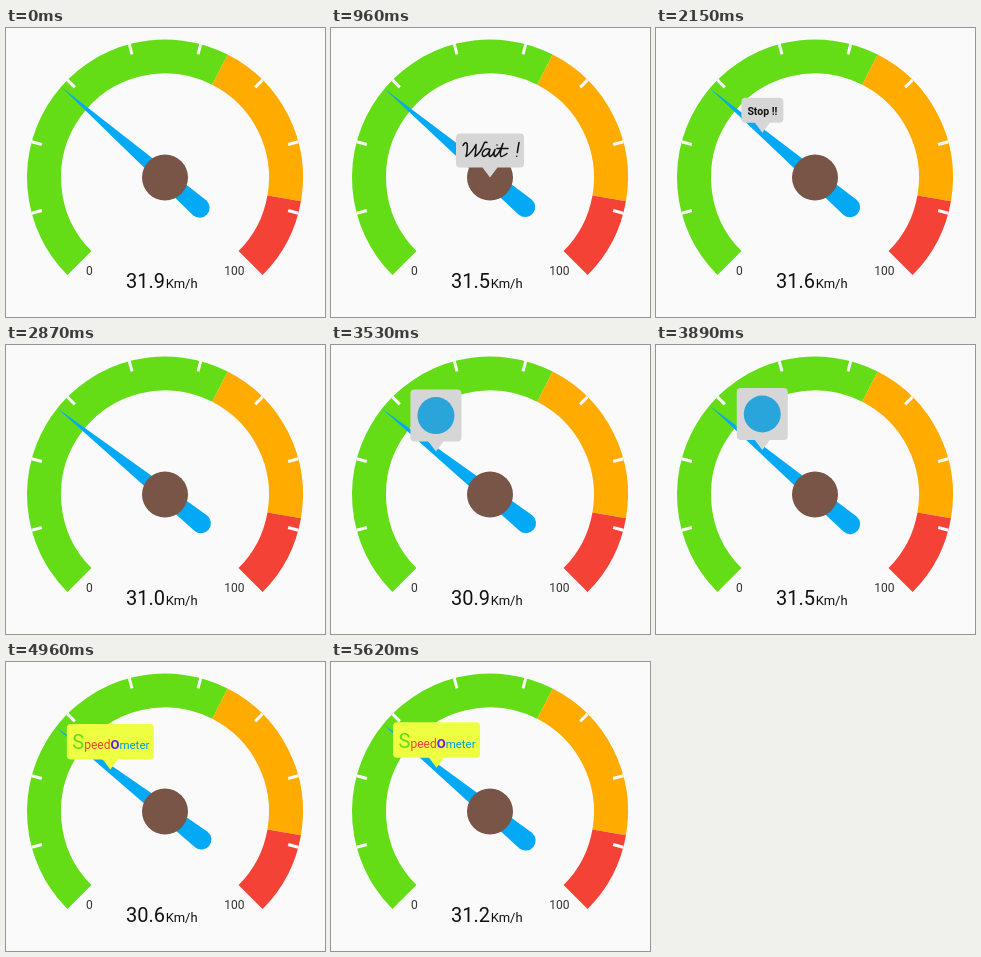
Write an HTML page that moves like this. It is 319 px wide and 289 px high and loops after 5.67 s.

```html
<!DOCTYPE html>
<html lang="en">
<head>
<meta charset="utf-8">
<title>Speed gauge</title>
<style>
  html, body { margin: 0; width: 100%; height: 100%; overflow: hidden; background: #fafafa; }
  svg { display: block; width: 319px; height: 289px; font-family: Roboto, "Open Sans", sans-serif; }
</style>
</head>
<body>
<svg viewBox="0 0 319 289">
  <g transform="translate(159 149.5)">
    <g id="dial" fill="none"></g>
    <path id="needle" d="M138 0L-46 10A10 10 0 0 1 -46 -10Z" fill="#03a9f4"/>
    <circle r="23" fill="#795548"/>
  </g>
  <g font-size="12" fill="#333" text-anchor="middle">
    <text x="83.3" y="247">0</text>
    <text x="228.3" y="247">100</text>
  </g>
  <text id="speed" x="159" y="260" font-size="20" fill="#111" text-anchor="end"></text>
  <text x="159.7" y="260" font-size="13" fill="#111">Km/h</text>

  <!-- Each note has its pointer tip at the local origin -->
  <g class="note" data-w="68" data-h="34" data-color="#d6d6d6" data-r="0" data-from="400" data-to="1400">
    <g role="img" aria-label="Wait !" fill="none" stroke="#111" stroke-width="1.5" stroke-linecap="round" stroke-linejoin="round">
      <path d="M-27 -32Q-25 -36 -23 -34Q-22 -29 -24 -21Q-18 -25 -14 -33Q-14 -27 -15 -21Q-9 -25 -6 -34Q-5 -36 -3 -35"/>
      <path d="M0 -28Q-4 -30 -7 -26Q-9 -22 -6 -21Q-2 -22 0 -28Q-2 -22 0 -21Q3 -22 5 -28Q3 -22 5 -21Q9 -23 13 -34Q9 -23 11 -21Q13 -21 17 -24"/>
      <path d="M7 -29H18M7 -32.5V-32.4M29 -35L27.3 -25M26.7 -21.3V-21.2"/>
    </g>
  </g>
  <g class="note" data-w="42" data-h="25" data-color="#d6d6d6" data-r="69" data-from="1850" data-to="2850">
    <text y="-18" font-size="10.5" font-weight="700" fill="#111" text-anchor="middle">Stop !!</text>
  </g>
  <g class="note" data-w="51" data-h="52" data-color="#d6d6d6" data-r="69" data-from="3300" data-to="4300">
    <circle cy="-36" r="18.5" fill="#29a5dc"/>
  </g>
  <g class="note" data-w="87" data-h="35.5" data-color="#eeff41" data-r="69" data-from="4800" data-to="5670">
    <text x="-38" y="-20" font-size="12" fill="#f44336"><tspan font-size="20" fill="#64dd17">S</tspan>peed<tspan font-size="13" font-weight="700" fill="#651fff">O</tspan><tspan font-size="11.5" fill="#039be5">meter</tspan></text>
  </g>
</svg>
<script>
const LOOP = 5670;
const $ = id => document.getElementById(id);
const angleOf = value => 135 + value * 2.7;

function polar(r, degrees) {
  const a = degrees * Math.PI / 180;
  return [r * Math.cos(a), r * Math.sin(a)];
}

function addPath(parent, attrs, first) {
  const path = document.createElementNS("http://www.w3.org/2000/svg", "path");
  for (const key in attrs) path.setAttribute(key, attrs[key]);
  parent.insertBefore(path, first ? parent.firstChild : null);
}

function addBand(from, to, color) {
  const large = to - from > 66 ? 1 : 0;
  const d = `M${polar(121, angleOf(from))}A121 121 0 ${large} 1 ${polar(121, angleOf(to))}`;
  addPath($("dial"), { d, stroke: color, "stroke-width": 34 });
}

addBand(0, 60, "#64dd17");
addBand(60, 87, "#ffab00");
addBand(87, 100, "#f44336");
for (let a = 165; a <= 375; a += 30) {
  addPath($("dial"), { d: `M${polar(127.5, a)}L${polar(138, a)}`, stroke: "#fafafa", "stroke-width": 3 });
}

const notes = [...document.querySelectorAll(".note")].map(el => {
  const { color } = el.dataset;
  const [w, h, r, from, to] = ["w", "h", "r", "from", "to"].map(k => +el.dataset[k]);
  const d = `M0 0L-7.5 -10H${4 - w / 2}a4 4 0 0 1 -4 -4v${8 - h}a4 4 0 0 1 4 -4` +
    `h${w - 8}a4 4 0 0 1 4 4v${h - 8}a4 4 0 0 1 -4 4H7.5Z`;
  addPath(el, { d, fill: color }, true);
  return { el, r, from, to };
});

// Trembling speed: [time, value]
const speeds = [
  [0, 31.9], [450, 32.1], [960, 31.5], [1500, 31.2], [2150, 31.6], [2800, 31],
  [3200, 30.8], [3530, 30.9], [4360, 32.5], [4960, 30.6], [5400, 30.8], [5620, 31.2], [LOOP, 31.3]
];

function speedAt(t) {
  const i = speeds.findIndex(([time]) => time > t);
  const [t0, v0] = speeds[i - 1], [t1, v1] = speeds[i];
  const p = (t - t0) / (t1 - t0);
  return v0 + (v1 - v0) * (1 - Math.cos(Math.PI * p)) / 2;
}

function render(t) {
  const value = speedAt(t), angle = angleOf(value);
  $("needle").setAttribute("transform", `rotate(${angle})`);
  $("speed").textContent = value.toFixed(1);
  for (const { el, r, from, to } of notes) {
    const [x, y] = polar(r, angle);
    el.setAttribute("transform", `translate(${159 + x} ${149.5 + y})`);
    el.setAttribute("visibility", t >= from && t < to ? "visible" : "hidden");
  }
}

const start = performance.now();
function tick() {
  render((performance.now() - start) % LOOP);
  requestAnimationFrame(tick);
}
tick();
</script>
</body>
</html>
```
